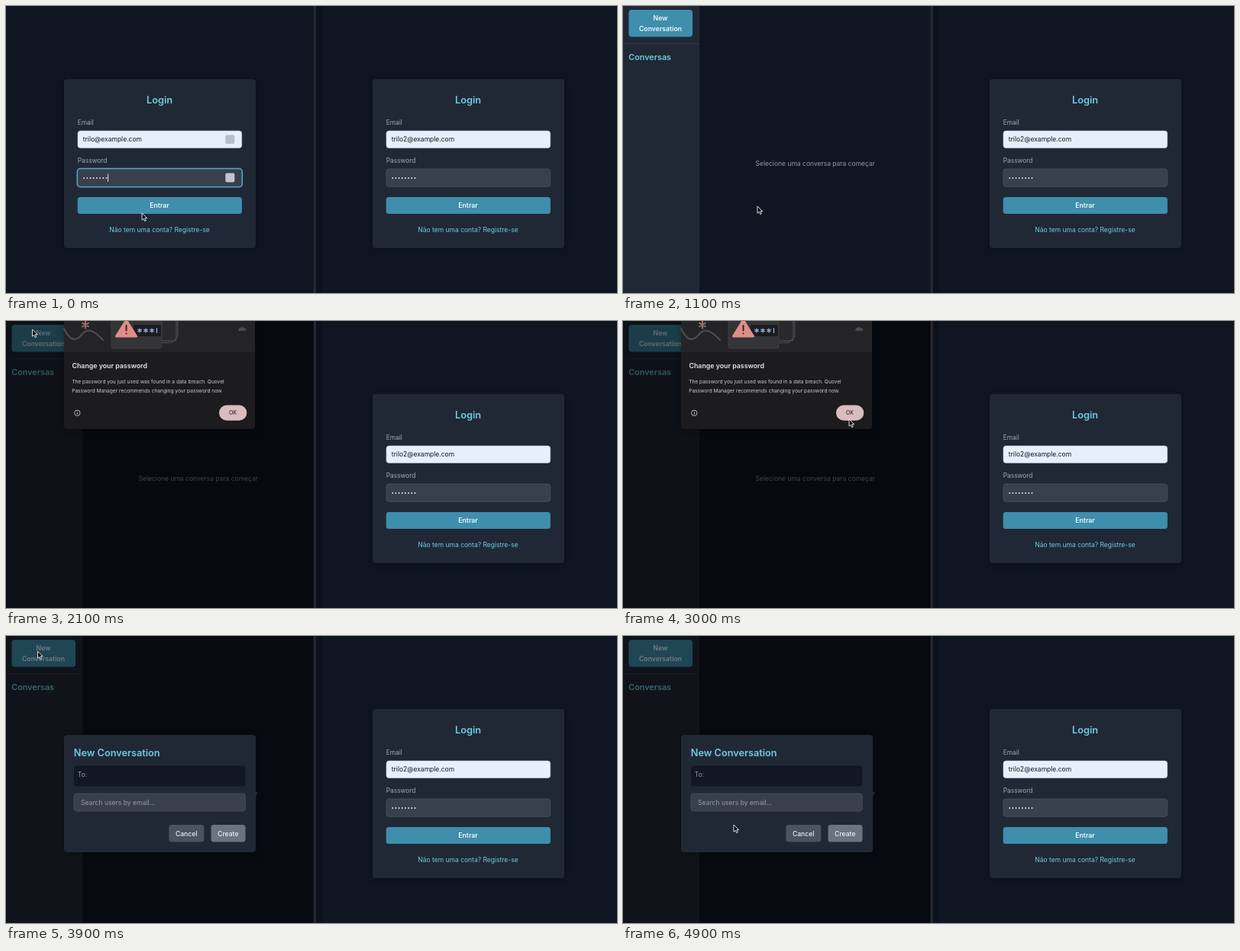
An HTML page for the animation above (5 s loop, 800 px wide and 377 px high).

```html
<!DOCTYPE html>
<html lang="pt">
<head>
<meta charset="utf-8">
<title>Login</title>
<style>
html, body { margin: 0; width: 100%; height: 100%; overflow: hidden; background: #0f1622; }
svg { display: block; width: 100vw; height: 100vh; }
text { font-family: Inter, "Open Sans", sans-serif; white-space: pre; }
.card { filter: drop-shadow(0 2px 4px rgba(0, 0, 0, .3)); }
</style>
</head>
<body>
<svg id="stage" viewBox="0 0 800 377" xmlns="http://www.w3.org/2000/svg"></svg>
<script>
const LOOP = 5000;
const CYAN = '#6dcce0', BLUE = '#3e8eac', HOVER = '#34738e', CARD = '#212835', BG = '#0f1622';
const stage = document.getElementById('stage');

const box = (x, y, w, h, fill, r = 0, more = '') =>
  `<rect x="${x}" y="${y}" width="${w}" height="${h}" rx="${r}" fill="${fill}" ${more}/>`;
const text = (x, y, size, fill, str, weight = 400, anchor = 'start', more = '') =>
  `<text x="${x}" y="${y}" font-size="${size}" fill="${fill}" font-weight="${weight}" text-anchor="${anchor}" ${more}>${str}</text>`;
const mid = (x, y, size, fill, str, weight, more) => text(x, y, size, fill, str, weight, 'middle', more);
const line = (d, color, w) =>
  `<path d="${d}" fill="none" stroke="${color}" stroke-width="${w}" stroke-linecap="round"/>`;
const group = (id, body) => `<g id="${id}">${body}</g>`;

function bullets() {
  let out = '';
  for (let i = 0; i < 8; i++) out += `<circle cx="${102.2 + i * 4.18}" cy="226" r=".95" fill="#e6e9ee"/>`;
  return out;
}

function login(id, x, email, extra = '') {
  return `<g id="${id}" transform="translate(${x})">`
    + box(76, 96, 251, 222, CARD, 4, 'class="card"')
    + mid(201, 128, 12.8, CYAN, 'Login', 600)
    + text(93.7, 155.6, 8.4, '#a0a7b2', 'Email')
    + box(94, 164, 214.7, 22.5, '#e8effc', 3.5, 'stroke="#c5ccda" stroke-width=".6"')
    + text(100.8, 178.2, 8.5, '#12161f', email)
    + text(93.7, 206, 8.4, '#a0a7b2', 'Password')
    + box(94, 214, 214.7, 23.3, '#383f4d', 3.5, 'stroke="#4d5461" stroke-width=".8"')
    + bullets()
    + box(93.7, 251, 215.2, 22, BLUE, 3.5, `id="${id}Btn"`)
    + mid(201, 265.3, 8.7, '#f4f8fa', 'Entrar', 600, `id="${id}Lbl"`)
    + mid(201, 297, 8.5, CYAN, 'Não tem uma conta? Registre-se')
    + extra + '</g>';
}

const fieldExtras = box(287.3, 169.2, 12, 11.8, '#b9bfc9', 2) + box(287.3, 219.6, 12, 11.8, '#c0c4cb', 2)
  + group('focus', box(93.3, 213.5, 216, 24.2, 'none', 4, 'stroke="#4cabc3" stroke-width="1.5"')
  + box(133.2, 220.5, .9, 10.5, '#f0f2f5', 0, 'id="caret"'));

const chat = box(0, 0, 403, 377, BG) + box(0, 0, 100, 377, CARD)
  + box(7.5, 5, 83.5, 35.5, BLUE, 4, 'id="newBtn"')
  + mid(49, 19.4, 8.7, '#f4f8fa', 'New', 600)
  + mid(49, 32.8, 8.7, '#f4f8fa', 'Conversation', 600)
  + box(0, 49, 100, .8, '#323946')
  + text(7.2, 71.3, 10.8, CYAN, 'Conversas', 600)
  + mid(251.8, 210.4, 8.5, '#9299a5', 'Selecione uma conversa para começar');

function asterisk(x, y, r, color, w) {
  let d = '';
  for (let i = 0; i < 3; i++) {
    const a = Math.PI / 2 + i * Math.PI / 3, dx = r * Math.cos(a), dy = r * Math.sin(a);
    d += `M${x - dx} ${y - dy}L${x + dx} ${y + dy}`;
  }
  return line(d, color, w);
}

const art = line('M76 10C83 25 91 28 99 18S116 13 127 25', '#4b4b4f', 2.2)
  + asterisk(104, 5, 4.5, '#a87773', 1.8)
  + box(150, -8, 73, 34, '#29292c', 2, 'stroke="#47474b" stroke-width="1.4"')
  + line('M205 28.5H217L225 20V0', '#47474b', 1.4)
  + box(138, -6, 66, 42, '#343437', 3, 'stroke="#434347" stroke-width=".8"')
  + box(167, 5, 36, 15, '#1c1c20', 2)
  + '<path d="M157.5-1L170.5 20H144.5Z" fill="#df8e87" stroke="#df8e87" stroke-width="3" stroke-linejoin="round"/>'
  + line('M157.5 6V12.5M157.5 16.4V16.6', '#3b1c1b', 2)
  + [175, 183, 191].map(x => asterisk(x, 12.5, 2.6, '#a9bfe4', 1.1)).join('')
  + line('M197.5 9.5V15.5', '#a9bfe4', 1.1)
  + '<path d="M304 13A5.2 5 0 0 1 314.4 13Z" fill="#4b4b4f"/>';

const warning = box(0, 0, 403, 377, '#000', 0, 'opacity=".57"')
  + `<g class="card"><path d="M76 0H326V138Q326 142 322 142H80Q76 142 76 138Z" fill="#1c1b1d"/>`
  + box(76, 0, 250, 41, '#242427') + '</g>' + art
  + text(86.5, 62.3, 8.8, '#e6e4e5', 'Change your password', 600)
  + text(86.2, 82.4, 6.6, '#cfcccd', 'The password you just used was found in a data breach. Quovel')
  + text(86.2, 93.8, 6.6, '#cfcccd', 'Password Manager recommends changing your password now.')
  + '<circle cx="93.3" cy="120.8" r="3.7" fill="none" stroke="#c9c6c7" stroke-width=".9"/>'
  + line('M93.3 120.5V122.6M93.3 118.8V118.9', '#c9c6c7', .9)
  + box(279, 110.5, 36.3, 20.3, '#d9bcbd', 10.1)
  + mid(297, 123.4, 7, '#4a2628', 'OK', 500);

const modal = box(0, 0, 403, 377, '#000', 0, 'opacity=".5"')
  + box(76, 130, 251, 154, CARD, 4, 'class="card"')
  + text(88.8, 157.6, 12.7, CYAN, 'New Conversation', 600)
  + box(89, 170.5, 224.3, 27, '#111724', 3.5)
  + text(93.8, 185.3, 8.4, '#9299a5', 'To:')
  + box(89, 207, 224.3, 23, '#393f4d', 3.5, 'stroke="#4d5461" stroke-width=".8"')
  + text(98, 221.6, 8.6, '#959ca8', 'Search users by email...')
  + box(213.3, 248, 46, 22.6, '#4b5260', 3.5) + mid(236.2, 262.5, 8.6, '#eceef1', 'Cancel', 500)
  + box(268.5, 248, 45, 22.6, '#6b7280', 3.5) + mid(290.8, 262.5, 8.6, '#eceef1', 'Create', 500);

stage.innerHTML = box(0, 0, 800, 377, BG)
  + login('a', 0, 'trilo@example.com', fieldExtras)
  + group('chat', chat) + group('warning', warning) + group('modal', modal)
  + box(403, 0, 397, 377, BG) + box(406, 0, 8, 377, '#0c121d')
  + box(402.8, 0, 3, 377, '#29292f')
  + login('b', 404, 'trilo2@example.com')
  + group('cursor', '<path d="M0 0V9.2L2.2 7.3L3.7 10.6L5.3 9.9L3.8 6.7H6.7Z" fill="#0a0a0c" stroke="#f2f2f2" stroke-width=".9" stroke-linejoin="round"/>');

const el = id => document.getElementById(id);
const show = (id, level) => {
  el(id).style.display = level > 0 ? '' : 'none';
  el(id).style.opacity = level;
};
const ramp = (t, a, b) => Math.min(1, Math.max(0, (t - a) / (b - a)));
const ease = u => u * u * (3 - 2 * u);

// Pointer stops: time, x, y
const stops = [
  [0, 178, 272], [100, 178, 272], [400, 176, 263], [1200, 176, 263], [1700, 34.5, 11],
  [2150, 34.5, 11], [2800, 296, 129], [3100, 296, 129], [3300, 195, 110],
  [3800, 41.5, 20], [4150, 41.5, 20], [4700, 145, 248], [5000, 145, 248]
];

function pointer(t) {
  const i = Math.max(1, stops.findIndex(s => s[0] > t));
  const [t0, x0, y0] = stops[i - 1], [t1, x1, y1] = stops[i];
  const u = ease(ramp(t, t0, t1));
  return [x0 + (x1 - x0) * u, y0 + (y1 - y0) * u];
}

function draw(t) {
  const [x, y] = pointer(t);
  const sending = t >= 600;
  el('cursor').setAttribute('transform', `translate(${x} ${y})`);

  show('focus', t < 600 ? 1 : 0);
  el('aBtn').setAttribute('fill', sending ? '#6b7380' : y < 270 ? HOVER : BLUE);
  el('aLbl').textContent = sending ? 'A entrar...' : 'Entrar';

  show('chat', t >= 1100 ? 1 : 0);
  show('warning', t < 2000 ? 0 : ramp(t, 1900, 2100) * (1 - ramp(t, 3080, 3200)));
  show('modal', t >= 3900 ? 1 : 0);
  const over = x > 7.5 && x < 91 && y > 5 && y < 40.5;
  el('newBtn').setAttribute('fill', over && (t < 2000 || t > 3300 && t < 3900) ? HOVER : BLUE);
}

function tick(now) {
  draw(now % LOOP);
  requestAnimationFrame(tick);
}
draw(0);
requestAnimationFrame(tick);
</script>
</body>
</html>
```
